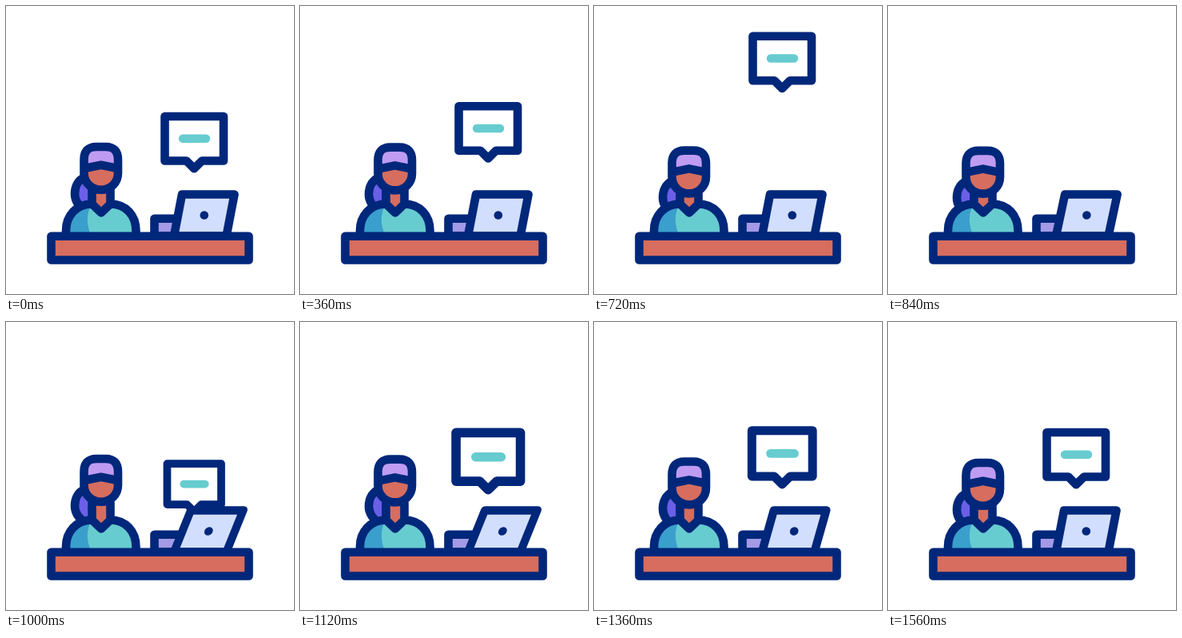
An HTML page for the animation above (2 s loop, 360 by 360 pixels).

```html
<!DOCTYPE html>
<html lang="en">
<head>
<meta charset="utf-8">
<title>Help desk</title>
<style>
  html, body { margin: 0; width: 100%; height: 100%; overflow: hidden; background: #fff; }
  svg { display: block; width: 100vw; height: 100vh; }
  .ink { stroke: #00277a; stroke-width: 10.6; stroke-linejoin: round; stroke-linecap: round; }
</style>
</head>
<body>
<svg viewBox="0 0 360 360" fill="none">
  <g id="bubble">
    <path class="ink" fill="#fff" d="M198.5 138H272V193.5H245L235.2 203.2L225.5 193.5H198.5Z"/>
    <path d="M221 165.8H250" stroke="#67cccf" stroke-width="10.4" stroke-linecap="round"/>
  </g>

  <path class="ink" fill="#a49ae6" d="M185.5 287.5V265.8H218V287.5Z"/>
  <g id="laptop">
    <path class="ink" fill="#d2defe" d="M220 235.5H285.5L275.5 287.5H210Z"/>
    <circle cx="247.8" cy="261.5" r="5.3" fill="#00277a"/>
  </g>

  <path id="tail" class="ink" fill="#6b5fe8" d="M98 214C89 218 86 227 86 235C86 244 92 252 100 256H112V214Z"/>
  <path fill="#67cccf" d="M75 288V281C75 262 88 247.5 107.5 247.5H130.5C150 247.5 162.5 262 162.5 281V288Z"/>
  <path fill="#3a9fcc" d="M75 288V281C75 262 88 247.5 107.5 247.5C100 259 100 273 107 288Z"/>
  <path class="ink" d="M75 287V281C75 262 88 247.5 107.5 247.5H130.5C150 247.5 162.5 262 162.5 281V287"/>
  <path class="ink" fill="#d66d5e" d="M107.5 226V247.5L119 258.5L130.5 247.5V226"/>
  <g id="head">
    <path fill="#d66d5e" d="M97.5 200H140V209C140 221 130.500 229.800 118.800 229.800S97.500 221 97.500 209Z"/>
    <path fill="#bf9cf2" d="M97.500 203V192Q97.500 176 113 176H124.500Q140 176 140 192V203L118.800 198.800Z"/>
    <path class="ink" d="M97.500 192Q97.500 176 113 176H124.500Q140 176 140 192V209C140 221 130.500 229.800 118.800 229.800S97.500 221 97.500 209Z"/>
    <path class="ink" d="M98 203L118.800 198.800L139.500 203"/>
  </g>

  <path class="ink" fill="#d66d5e" d="M56.500 287.800H303.500V317.500H56.500Z"/>
</svg>
<script>
  const LOOP = 2000, STEP = 40;
  const [bubble, laptop, tail, head] =
    ['bubble', 'laptop', 'tail', 'head'].map(id => document.getElementById(id));

  const span = (t, from, to) => Math.min(1, Math.max(0, (t - from) / (to - from)));
  const smooth = u => u * u * (3 - 2 * u);
  const ease = (t, from, to) => smooth(span(t, from, to));
  const move = (el, value) => el.setAttribute('transform', value);

  function draw(t) {
    const lift = span(t, 160, 800) ** 2;

    // The bubble accelerates away, then a new one pops out of the laptop.
    if (t < 840) {
      move(bubble, `translate(0 ${-131 * lift})`);
    } else {
      const grow = 1.1 * (1 - (1 - span(t, 840, 1160)) ** 2.6);
      const scale = grow - 0.1 * ease(t, 1160, 1480);
      const drop = 57 * (1 - ease(t, 840, 1200));
      move(bubble, `translate(235 ${210 + drop}) scale(${scale}) translate(-235 -210)`);
    }

    const nod = 6 * lift - 11 * ease(t, 800, 1000) + 5 * ease(t, 1000, 1560);
    move(head, `translate(0 ${nod})`);
    move(tail, `translate(0 ${nod})`);

    const tilt = 11 / 52 * (ease(t, 800, 1000) - ease(t, 1120, 1560));
    move(laptop, `matrix(1 0 ${-tilt} 1 ${287.5 * tilt} 0)`);
  }

  function tick() {
    const t = performance.now() % LOOP;
    draw(Math.floor(t / STEP) * STEP);
    requestAnimationFrame(tick);
  }
  tick();
</script>
</body>
</html>
```
